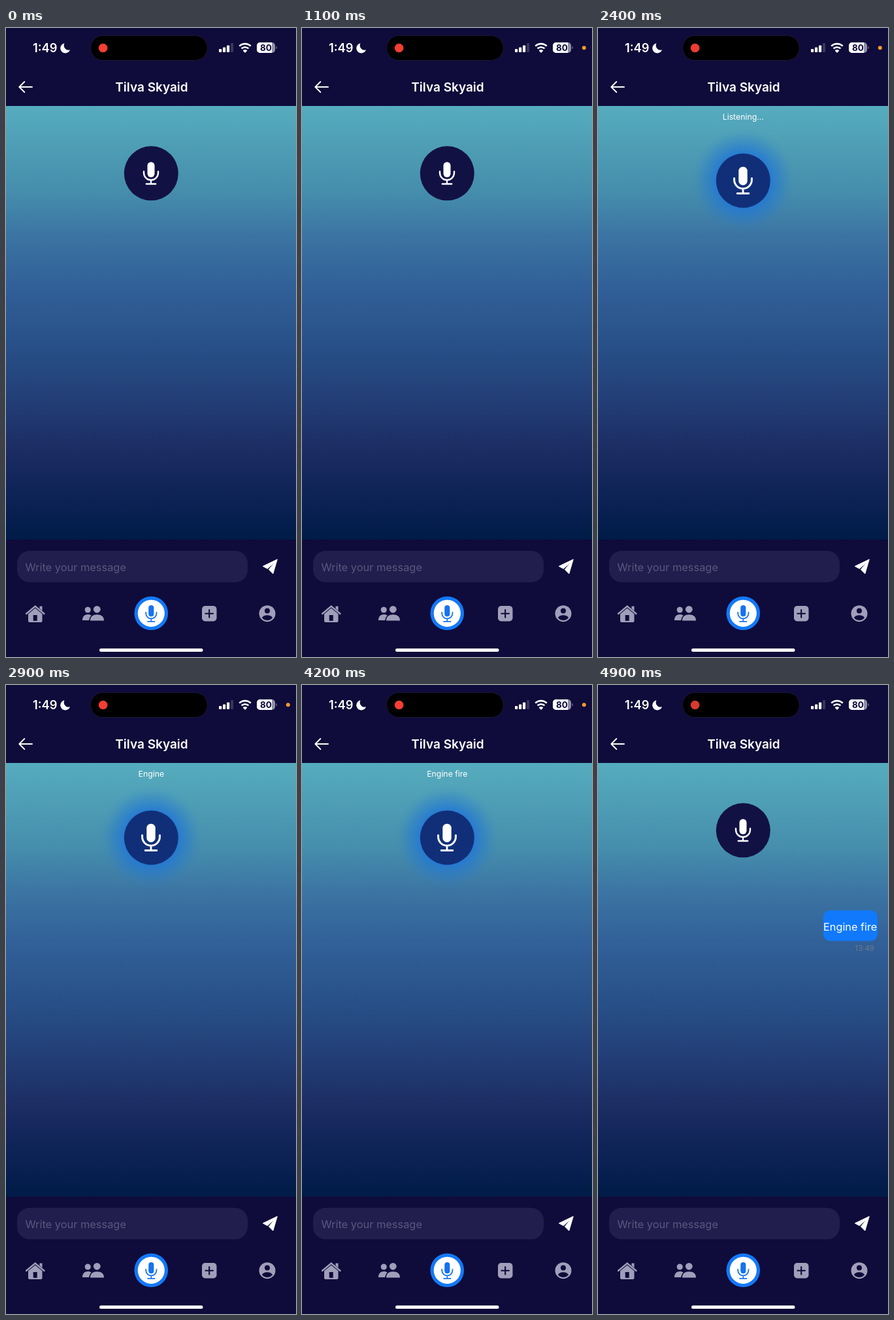
An HTML page that plays this animation: 444x960 px, repeating every 5 s.

```html
<!DOCTYPE html>
<html lang="en">
<head>
<meta charset="utf-8">
<title>Voice assistant</title>
<style>
html, body { margin: 0; width: 100%; height: 100%; overflow: hidden; background: #0f0b3a; }
svg { display: block; width: 100%; height: 100%; }
text { font-family: Inter, "Open Sans", sans-serif; fill: #fff; }
.mid { text-anchor: middle; }
.line { fill: none; stroke: #fff; stroke-linecap: round; stroke-linejoin: round; }
</style>
</head>
<body>
<svg viewBox="0 0 444 960">
  <defs>
    <linearGradient id="sky" x2="0" y2="1">
      <stop offset="0" stop-color="#56acbe"/>
      <stop offset=".2" stop-color="#458dac"/>
      <stop offset=".3" stop-color="#3b74a3"/>
      <stop offset=".42" stop-color="#315f97"/>
      <stop offset=".55" stop-color="#285088"/>
      <stop offset=".67" stop-color="#233f78"/>
      <stop offset=".79" stop-color="#1c2d63"/>
      <stop offset=".88" stop-color="#102458"/>
      <stop offset="1" stop-color="#001b48"/>
    </linearGradient>
    <radialGradient id="glow">
      <stop offset=".5" stop-color="#1f76d8" stop-opacity=".85"/>
      <stop offset=".72" stop-color="#2479d0" stop-opacity=".45"/>
      <stop offset=".9" stop-color="#2a7cca" stop-opacity=".1"/>
      <stop offset="1" stop-color="#2a7cca" stop-opacity="0"/>
    </radialGradient>
    <g id="mic" stroke-linecap="round" stroke-width="2.4">
      <rect x="-5.5" y="-17.5" width="11" height="23.3" rx="5.5" fill="currentColor"/>
      <path d="M-11 -3v2a11 11 0 0 0 22 0v-2M0 10v6M-7.2 16h14.4" fill="none" stroke="currentColor"/>
    </g>
  </defs>

  <rect width="444" height="960" fill="#0f0b3a"/>
  <rect y="119" width="444" height="662" fill="url(#sky)"/>

  <!-- status bar -->
  <text x="41" y="37" font-size="18.3" font-weight="600">1:49</text>
  <path d="M89.5 23.3A7.6 7.6 0 1 0 98 33.2A7 7 0 0 1 89.5 23.3z" fill="#fff"/>
  <rect x="129.5" y="11.5" width="179" height="38" rx="19" fill="#000" stroke="#1b1738"/>
  <circle id="rec" cx="148.6" cy="30.5" r="6.8"/>
  <g fill="#fff">
    <rect x="326" y="32" width="4.2" height="5" rx="1"/>
    <rect x="332" y="29.5" width="4.2" height="7.5" rx="1"/>
    <rect x="338" y="26.5" width="4.2" height="10.5" rx="1"/>
    <rect x="344" y="23" width="4.2" height="14" rx="1" fill="#39355f"/>
    <path d="M366 38l-3.4-3.5a4.8 4.8 0 0 1 6.8 0z"/>
  </g>
  <path d="M360.6 31.4a7.7 7.7 0 0 1 10.8 0M357.3 27.6a12.5 12.5 0 0 1 17.4 0" fill="none" stroke="#fff" stroke-width="2.6"/>
  <path d="M389 22h18a5 5 0 0 1 5 5v6a5 5 0 0 1-5 5h-18a5 5 0 0 1-5-5v-6a5 5 0 0 1 5-5z" fill="#918fa8"/>
  <path d="M389 22h18v16h-18a5 5 0 0 1-5-5v-6a5 5 0 0 1 5-5z" fill="#fff"/>
  <path d="M413.5 27.5q2.4 2.5 0 5z" fill="#918fa8"/>
  <text class="mid" x="398" y="35" font-size="13.5" font-weight="700" style="fill:#0f0b3a">80</text>
  <circle id="orange" cx="431.8" cy="30.3" r="3" fill="#f49a2c"/>

  <!-- header -->
  <path class="line" d="M40 90H20.5M28.3 82L20.3 90L28.3 98" stroke-width="1.9"/>
  <text class="mid" x="223" y="97" font-size="19" font-weight="600">Tilva Skyaid</text>

  <!-- voice button -->
  <g id="idle" color="#fff">
    <circle cx="222.3" cy="221.8" r="41.5" fill="#121144"/>
    <use href="#mic" x="222" y="222"/>
  </g>
  <g id="live" color="#fff">
    <circle cx="222.3" cy="233" r="80" fill="url(#glow)"/>
    <circle cx="222.3" cy="233" r="41.5" fill="#112f78"/>
    <use href="#mic" transform="translate(222 233) scale(1.22)"/>
    <text id="heard" class="mid" x="222.3" y="140" font-size="12.3"></text>
  </g>
  <g id="bubble">
    <rect x="345" y="344" width="83" height="46.5" rx="10" fill="#1179fc"/>
    <text class="mid" x="386.2" y="374.5" font-size="16.3">Engine fire</text>
    <text x="423" y="406" font-size="11.5" text-anchor="end" style="fill:#71798f">13:49</text>
  </g>

  <!-- message field -->
  <rect x="17" y="798" width="353" height="48" rx="19" fill="#211d4c"/>
  <text x="29.5" y="828.5" font-size="16.4" style="fill:#5b577f">Write your message</text>
  <path d="M415.3 811L393.3 821.5L400.2 825.2L411.5 815.2L402.4 826.6L408.8 833z" fill="#fff" stroke="#fff" stroke-linejoin="round"/>

  <!-- tabs -->
  <g fill="#a09eb9">
    <path d="M31 894L44.7 882.5L58.5 894" fill="none" stroke="#a09eb9" stroke-width="2.4" stroke-linecap="round"/>
    <path d="M51.5 882.5h4v7l-4-3.5z"/>
    <path d="M34 894.3L44.7 885.5L55.5 894.3V905a2 2 0 0 1-2 2H36a2 2 0 0 1-2-2z"/>
    <rect x="41.7" y="896" width="6" height="8.8" fill="#0f0b3a"/>
    <circle cx="125.2" cy="888" r="4.6"/>
    <path d="M117 904c0-6 3.5-9 8.5-9 2 0 4 .6 5.2 1.7-2.2 1.8-3.2 4.3-3.5 7.3z"/>
    <circle cx="139.3" cy="887.3" r="5.4"/>
    <path d="M129 904.5c0-6.5 4.3-9.3 10.5-9.3s10.5 2.8 10.5 9.3z"/>
    <rect x="300" y="882" width="22.5" height="23.5" rx="5"/>
    <circle cx="400" cy="893.7" r="12.5"/>
  </g>
  <path d="M311.2 888v11.6M305.4 893.8H317" stroke="#0f0b3a" stroke-width="2.1" stroke-linecap="round"/>
  <circle cx="400" cy="889.5" r="4" fill="#0f0b3a"/>
  <path d="M392 900.2c2-5.4 14-5.4 16 0a10.3 10.3 0 0 1-16 0z" fill="#0f0b3a"/>
  <circle cx="222.3" cy="893.3" r="23.2" fill="#fff" stroke="#1278f8" stroke-width="5.2"/>
  <use href="#mic" transform="translate(222.3 894) scale(.74)" color="#1673ed"/>
  <rect x="143" y="947" width="158.5" height="5" rx="2.5" fill="#fff"/>
</svg>
<script>
const LOOP = 5000, PULSE = 1400;
const get = id => document.getElementById(id);
const [rec, orange, idle, live, heard, bubble] =
  ["rec", "orange", "idle", "live", "heard", "bubble"].map(get);
const show = (el, on) => el.setAttribute("opacity", +on);
const between = (t, from, to) => t >= from && t < to;

function draw(now) {
  const t = now % LOOP;
  const listening = between(t, 1200, 4600);
  show(idle, !listening);
  show(live, listening);
  show(orange, between(t, 1100, 4700));
  heard.textContent = t < 2900 ? "Listening..." : t < 3600 ? "Engine" : "Engine fire";
  show(bubble, Math.min(1, Math.max(0, (t - 4750) / 150)));

  const glow = .5 + .5 * Math.cos((t - 4100) / PULSE * 2 * Math.PI);
  rec.setAttribute("fill", `rgb(${214 + 38 * glow}, ${58 + 4 * glow}, ${48 + 4 * glow})`);
}

const start = performance.now();
function tick() {
  draw(performance.now() - start);
  requestAnimationFrame(tick);
}
tick();
</script>
</body>
</html>
```
